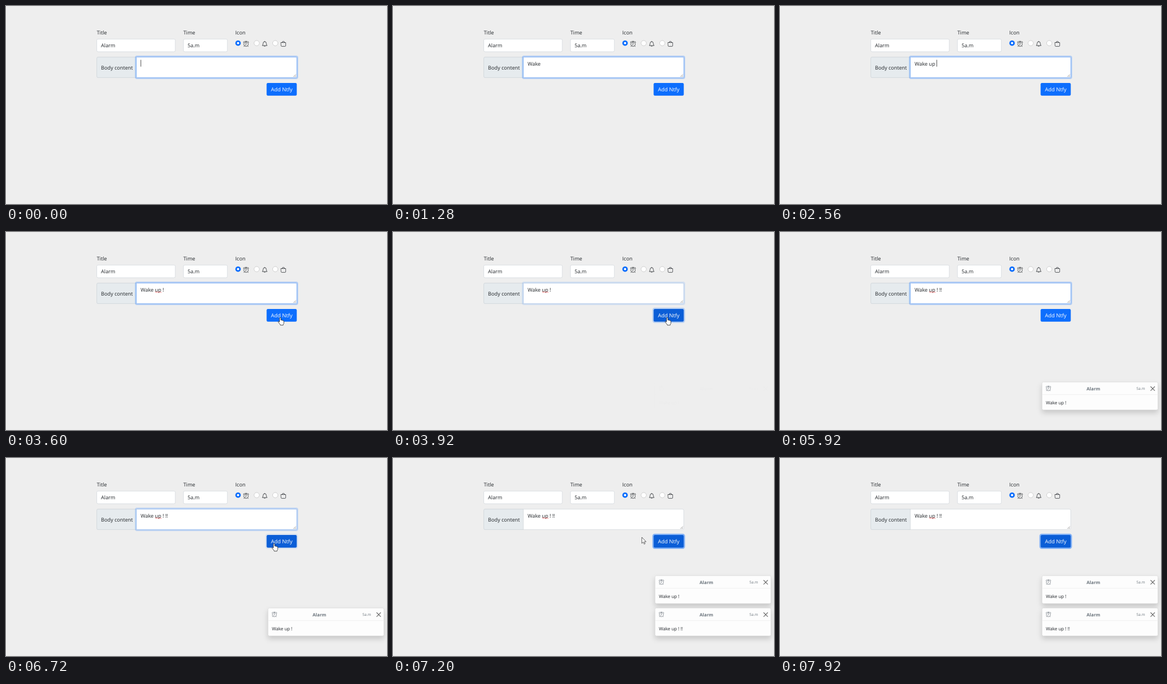
Write an HTML page that moves like this. It is 682 px wide and 355 px high and loops after 8 s.

```html
<!DOCTYPE html>
<html lang="en">
<head>
<meta charset="utf-8">
<title>Notification form</title>
<style>
  html, body { margin: 0; width: 100%; height: 100%; overflow: hidden; background: #eee; }
  svg { display: block; }
  text { font: 9.2px "Open Sans", "Noto Sans", sans-serif; fill: #212529; white-space: pre; text-rendering: geometricPrecision; }
  .field { fill: #fff; stroke: #ced4da; stroke-width: .7; }
  .icon { fill: none; stroke: currentColor; stroke-linecap: round; stroke-linejoin: round; }
  .radio { fill: #fff; stroke: #bfbfbf; stroke-width: .7; }
  .card { fill: #fdfdfd; stroke: #d5d5d5; stroke-width: .6; filter: drop-shadow(0 5px 5px rgba(0, 0, 0, .16)); }
  .toast text { font-size: 8.05px; }
  .toast .title { font-weight: 700; fill: #6c757d; text-anchor: middle; }
  .toast .time { font-size: 6.7px; fill: #6c757d; }
</style>
</head>
<body>
<svg width="682" height="355" viewBox="0 0 682 355">
  <defs>
    <symbol id="alarm" viewBox="0 0 16 16"><path class="icon" stroke-width="1.2" d="M8 3a6 6 0 1 0 .01 0M8 5.5V9l-1.5 2.5M6.5.7h3M8 .7V3M1.2 5A2.5 2.5 0 0 1 4.5 1.8M14.8 5a2.5 2.5 0 0 0-3.3-3.2M3.7 13.4l-1.5 1.9M12.3 13.4l1.5 1.9"/></symbol>
    <symbol id="bell" viewBox="0 0 16 16"><path class="icon" stroke-width="1.2" d="M8 .7v1.2M1.8 12.5C3.3 11 3.4 8.500 3.600 6.500a4.400 4.400 0 0 1 8.800 0C12.600 8.500 12.700 11 14.200 12.500zM6.300 14a1.800 1.600 0 0 0 3.400 0"/></symbol>
    <symbol id="bag" viewBox="0 0 16 16"><path class="icon" stroke-width="1.2" d="M1.500 4.500h13V13a2 2 0 0 1-2 2h-9a2 2 0 0 1-2-2zM5 4.500V4a3 3 0 0 1 6 0v.5"/></symbol>
    <g id="card">
      <rect class="card" x="469" y="0" width="207.500" height="50" rx="2.400"/>
      <path d="M469 22.500h207.500" stroke="#ececec" stroke-width=".7"/>
      <use href="#alarm" x="475.500" y="6.500" width="9.800" height="9.800" color="#6c757d"/>
      <path d="M663.300 8l7.600 7.600m0-7.600l-7.600 7.600" stroke="#666" stroke-width="1.100"/>
    </g>
  </defs>

  <rect width="682" height="355" fill="#eee"/>
  <rect width="1" height="355" fill="#fafafa"/>

  <text x="162.500" y="51">Title</text>
  <text x="317.500" y="51">Time</text>
  <text x="410.500" y="51">Icon</text>
  <rect class="field" x="162.500" y="59.300" width="140.500" height="22.700" rx="2.400"/>
  <rect class="field" x="317.700" y="59.300" width="78.500" height="22.700" rx="2.400"/>
  <text x="170" y="74.300">Alarm</text>
  <text x="325" y="74.300">5a.m</text>

  <circle cx="415.400" cy="66.600" r="4.900" fill="#0d6efd"/>
  <circle cx="415.400" cy="66.600" r="2" fill="#fff"/>
  <circle class="radio" cx="448.700" cy="66.600" r="4.700"/>
  <circle class="radio" cx="482" cy="66.600" r="4.700"/>
  <g color="#212529">
    <use href="#alarm" x="424.500" y="62.600" width="10.400" height="10.400"/>
    <use href="#bell" x="457.900" y="62.600" width="10.400" height="10.400"/>
    <use href="#bag" x="491.300" y="62.600" width="10.400" height="10.400"/>
  </g>

  <rect class="field" x="162.500" y="91.700" width="358" height="36.600" rx="2.400"/>
  <path d="M233.300 91.700H165a2.400 2.400 0 0 0-2.500 2.400v31.800a2.400 2.400 0 0 0 2.500 2.400h68.300z" fill="#e6ebee" stroke="#ced4da" stroke-width=".7"/>
  <text x="170" y="113.700">Body content</text>
  <g id="areaFocus" fill="none">
    <rect x="232" y="90.300" width="289.800" height="39.400" rx="2.500" stroke="#0d6efd" stroke-opacity=".27" stroke-width="2.400"/>
    <rect x="233.300" y="91.700" width="287.200" height="36.600" rx="1" stroke="#86b7fe" stroke-width=".8"/>
  </g>
  <path d="M514.500 127l4.500-4.500M517 127l2-2" stroke="#777" stroke-width=".7"/>
  <text id="body" x="241" y="106.700"></text>
  <path id="squiggle" d="M267 107.900q.7-1.300 1.400 0t1.400 0 1.400 0 1.400 0 1.400 0 1.400 0 1.400 0 1.400 0" fill="none" stroke="#e33" stroke-width=".8"/>
  <path id="caret" d="M0 96.500v12.200" stroke="#222" stroke-width=".8"/>

  <rect id="buttonRing" x="465.500" y="137" width="56" height="24.800" rx="3" fill="none" stroke="#3184fd" stroke-opacity=".55" stroke-width="2.400"/>
  <rect id="button" x="466.500" y="138" width="54" height="22.800" rx="2.400"/>
  <text x="493.500" y="152.800" text-anchor="middle" style="font-size:9.500px;fill:#fff">Add Ntfy</text>

  <g class="toast" id="first">
    <use href="#card"/>
    <text class="title" x="561" y="14.700">Alarm</text>
    <text class="time" x="638" y="14.200">5a.m</text>
    <text x="476" y="39.500">Wake up !</text>
  </g>
  <g class="toast" id="second" transform="translate(0 269)">
    <use href="#card"/>
    <text class="title" x="561" y="14.700">Alarm</text>
    <text class="time" x="638" y="14.200">5a.m</text>
    <text x="476" y="39.500">Wake up ! !!</text>
  </g>

  <g id="pointer" stroke-linejoin="round">
    <path id="hand" d="M-1.300 1q1.300-1.600 2.300 0v4q1.300-.7 2 .4 1.400-.6 1.900.5 1.400-.2 1.500 1.200v3q0 1.700-1.200 2.700v1.200h-5.200v-1L-3.400 9Q-4.400 7.300-2.900 7l1.600 1.300z" fill="#fff" stroke="#222" stroke-width=".8"/>
    <path id="arrow" d="M0 0v11l2.500-2.300 1.700 3.700 1.700-.8-1.700-3.500h3.500z" fill="#fff" stroke="#222" stroke-width=".7"/>
    <path id="beam" d="M-1.500-5.500h3M0-5.500v11M-1.500 5.500h3" stroke="#333" stroke-width=".7"/>
  </g>
</svg>
<script>
const LOOP = 8000, BLINK = 530;
const CLICK_1 = 3840, TOAST_1 = 3920, REFOCUS = 4640, CLICK_2 = 6690, TOAST_2 = 6820;
const MESSAGE = "Wake up ! !!";
// Entry n is the time at which n characters are present.
const keys = [-460, 240, 560, 640, 740, 1350, 1760, 1920, 2560, 2720, 4710, 5200, 5385];
// Pointer stops: time, x, y
const stops = [
  [3440, 400, 112], [3600, 491, 153], [4240, 491, 153], [4440, 284, 102],
  [6320, 284, 102], [6560, 480, 153], [7120, 480, 153], [7480, 212, 68]
];
const $ = id => document.getElementById(id);
const clamp = v => Math.max(0, Math.min(1, v));
const fade = (t, start) => clamp((t - start) / 150);
const show = (id, on) => $(id).style.opacity = +on;
const within = (x, y, l, t, r, b) => x > l && x < r && y > t && y < b;

function drawText(t) {
  const count = keys.filter(k => k <= t).length - 1;
  $("body").textContent = MESSAGE.slice(0, count);
  const focused = t < CLICK_1 || (t >= REFOCUS && t < CLICK_2);
  const since = t - Math.max(keys[count], t >= REFOCUS ? REFOCUS : -BLINK);
  show("caret", focused && since % (2 * BLINK) < BLINK);
  const width = count ? $("body").getComputedTextLength() : 0;
  $("caret").setAttribute("transform", `translate(${241.4 + width} 0)`);
  show("squiggle", t >= 2600);
}

function drawPointer(t) {
  show("pointer", (t >= 3440 && t < 4720) || (t >= 6320 && t < 7680));
  const next = stops.findIndex(s => s[0] > t);
  const i = next < 0 ? stops.length - 1 : next;
  const b = stops[i], a = stops[Math.max(0, i - 1)];
  const p = clamp((t - a[0]) / (b[0] - a[0])), e = p * p * (3 - 2 * p);
  const x = a[1] + (b[1] - a[1]) * e, y = a[2] + (b[2] - a[2]) * e;
  $("pointer").setAttribute("transform", `translate(${x} ${y})`);
  const onButton = within(x, y, 466, 138, 521, 161);
  const onField = within(x, y, 233, 91, 521, 129) || within(x, y, 162, 59, 303, 82);
  show("hand", onButton);
  show("beam", onField);
  show("arrow", !onButton && !onField);
}

function draw(t) {
  drawText(t);
  drawPointer(t);
  const ring = fade(t, CLICK_1) - fade(t, REFOCUS) + fade(t, CLICK_2);
  const dark = fade(t, 3600) - fade(t, REFOCUS) + fade(t, 6520);
  show("areaFocus", 1 - ring);
  show("buttonRing", ring);
  $("button").setAttribute("fill", `rgb(${13 - 2 * dark},${110 - 16 * dark},${253 - 38 * dark})`);
  show("first", fade(t, TOAST_1));
  show("second", fade(t, TOAST_2));
  $("first").setAttribute("transform", `translate(0 ${t < TOAST_2 ? 269 : 211})`);
}

const start = performance.now();
function tick() {
  draw((performance.now() - start) % LOOP);
  requestAnimationFrame(tick);
}
tick();
</script>
</body>
</html>
```
